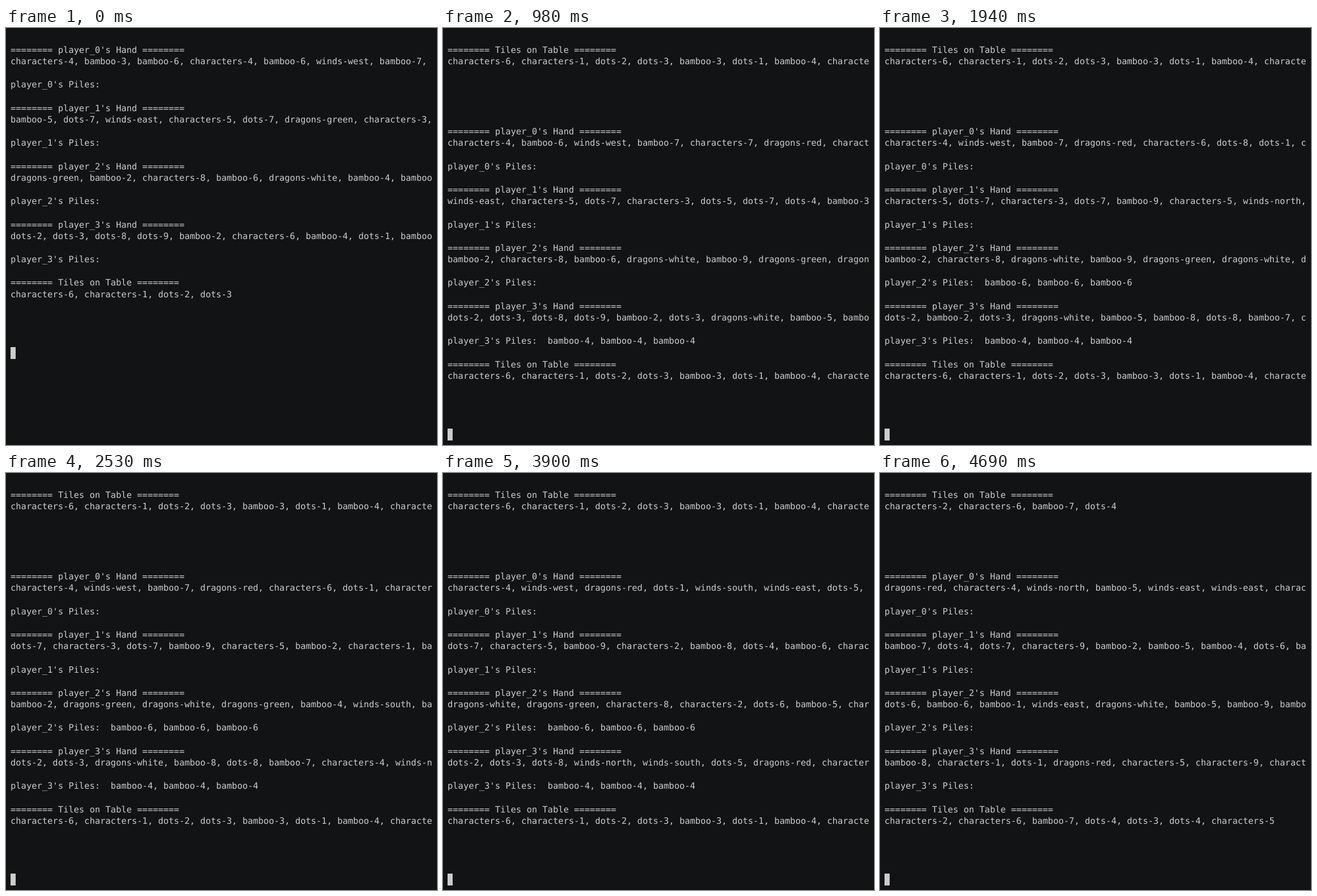
Recreate the animation shown at these times as an HTML page. Size 760 px wide and 737 px high, loop 5.69 s.

```html
<!DOCTYPE html>
<html lang="en">
<head>
<meta charset="utf-8">
<title>Mahjong in the terminal</title>
<style>
  html, body { margin: 0; width: 100%; height: 100%; overflow: hidden; background: #121314; }
  #screen {
    position: absolute; left: 8px; top: 8px; margin: 0;
    font: 15.447px/20.6px "DejaVu Sans Mono", monospace;
    color: #ccc; white-space: pre;
    font-variant-ligatures: none; text-rendering: geometricPrecision;
  }
  #screen div { height: 20.6px; }
  #cursor { position: absolute; left: 8px; width: 9.3px; height: 20.6px; background: #ccc; }
</style>
</head>
<body>
<div id="screen"></div>
<div id="cursor"></div>
<script>
const COLS = 80, ROWS = 35, LINE = 20.6, PAD = 8, LOOP = 5690;

const SUITS = { c: 'characters', b: 'bamboo', d: 'dots', D: 'dragons', W: 'winds' };
const KINDS = { g: 'green', w: 'white', r: 'red' };
const WINDS = { e: 'east', w: 'west', s: 'south', n: 'north' };

const tileName = ([s, v]) =>
  SUITS[s] + '-' + (s === 'D' ? KINDS[v] : s === 'W' ? WINDS[v] : v);
const listTiles = tiles => tiles.map(tileName).join(', ');
const split = text => text.split(' ').filter(Boolean);

// Each turn: time, then what players 0-3 give away, then the table if it changes.
const games = [
  {
    hands: [
      'c4 b3 b6 c4 b6 Ww b7 c7 Dr c6 d8 d1 c9 Ws We d5 b3 c3',
      'b5 d7 We c5 d7 Dg c3 d5 d7 d4 b3 b9 c5 Wn b2 c1 b9 c2 b8 d4 b6 c8',
      'Dg b2 c8 b6 Dw b4 b9 Dg Dw Dg b4 Ws b8 c8 c2 d6 b5 c7 b6',
      'd2 d3 d8 d9 b2 c6 b4 d1 b4 b2 d3 Dw b5 b8 d8 b7 c4 Wn Ws b1 d5 Dr c1 We'
    ],
    turns: [
      [0, '', '', '', '', 'c6 c1 d2 d3'],
      [200, 'b3', '', 'b4', 'b4 b4', 'c6 c1 d2 d3 b3 d1 b4'],
      [400, '', 'Dg', '', 'c6', 'c6 c1 d2 d3 b3 d1 b4 c6'],
      [590, '', '', '', 'd1'],
      [790, 'b6', 'b5', '', 'b2'],
      [980, 'c4', 'd7', 'Dg', ''],
      [1170, '', 'We', '', ''],
      [1360, 'c7', 'd5', '', ''],
      [1560, '', 'd4', '', 'd9'],
      [1750, '', 'b3', '', 'd3'],
      [1940, 'b6', '', 'b6 b6', 'd8'],
      [2140, '', 'Wn', 'Dw', 'b2'],
      [2330, '', '', 'b9', 'b5'],
      [2530, 'd8', 'c5', 'c8', ''],
      [2720, 'c6', '', 'b4', ''],
      [2920, '', 'd7', 'Ws', 'b7'],
      [3120, '', 'c1', '', 'b8'],
      [3310, '', 'b9', 'Dg', ''],
      [3510, '', 'c3', '', 'b1'],
      [3700, 'c9', 'b2', 'b2', 'c4'],
      [3900, 'b7', '', 'b8', 'Dw'],
      [4100, '', 'b9', '', 'c1']
    ]
  },
  {
    hands: [
      'Dr c4 c2 Wn d3 b5 We We c1',
      'd4 b7 d4 d7 c6 c9 b2 b5 b4 d6 b8',
      'd6 b6 b1 We Dw b5 b7 b9 b3',
      'b8 c1 d1 Dr c5 c9 c7'
    ],
    turns: [
      [4300, '', '', '', '', ''],
      [4490, 'c2', 'c6', 'b7', '', 'c2 c6 b7 d4'],
      [4690, 'd3', 'd4', '', '', 'c2 c6 b7 d4 d3 d4 c5']
    ]
  }
];

const heading = title => `======== ${title} ========`;
const tableLines = table => [heading('Tiles on Table'), listTiles(table), '', '', '', '', ''];

// Play the games through and keep the printed screen of every turn.
function buildScreens() {
  const screens = [];
  let table = [], before = null;
  for (const game of games) {
    const hands = game.hands.map(split);
    const piles = hands.map(() => []);
    for (const [time, ...rest] of game.turns) {
      hands.forEach((hand, p) => {
        const gone = split(rest[p]);
        gone.forEach(tile => hand.splice(hand.indexOf(tile), 1));
        // Giving up a pair claims a third tile for a pile.
        if (gone.length === 2) piles[p] = [...gone, gone[0]];
      });
      if (rest[4] !== undefined) table = split(rest[4]);

      const lines = [''];
      if (before) lines.push(...tableLines(before));
      hands.forEach((hand, p) => lines.push(
        heading(`player_${p}'s Hand`), listTiles(hand), '',
        `player_${p}'s Piles:  ` + listTiles(piles[p]), ''
      ));
      lines.push(...tableLines(table).slice(0, 6));
      screens.push({ time, lines: lines.map(l => l.slice(0, COLS)) });
      before = table;
    }
  }
  return screens;
}

const screens = buildScreens();
const screen = document.getElementById('screen');
const cursor = document.getElementById('cursor');
const rows = Array.from({ length: ROWS }, () => screen.appendChild(document.createElement('div')));
let shown = -1;

function draw(now) {
  const t = now % LOOP;
  const next = screens.findIndex(s => s.time > t);
  const index = (next < 0 ? screens.length : next) - 1;
  if (index !== shown) {
    shown = index;
    const { lines } = screens[index];
    rows.forEach((row, i) => { row.textContent = lines[i] || ''; });
    cursor.style.top = PAD + lines.length * LINE + 'px';
  }
}

const start = performance.now();
function tick() {
  draw(performance.now() - start);
  requestAnimationFrame(tick);
}
tick();
</script>
</body>
</html>
```
